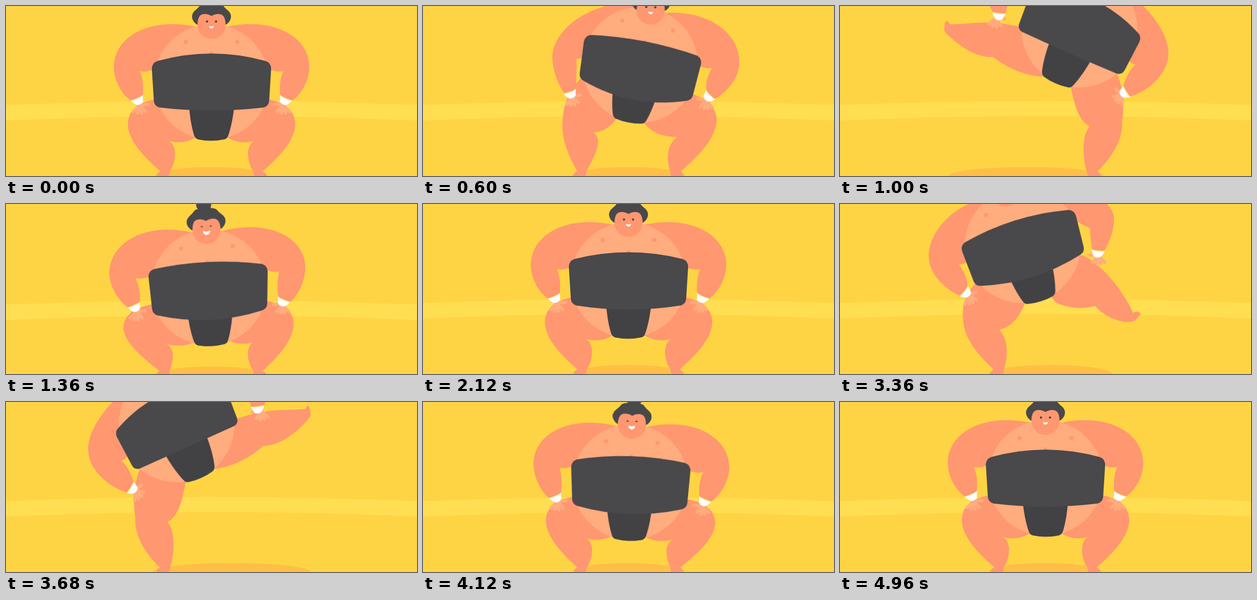
Animation, 820 px wide and 340 px high, one loop 5000 ms. Source, as an HTML page without scripts:

```html
<!DOCTYPE html>
<html lang="en">
<head>
<meta charset="utf-8">
<title>Sumo stomp</title>
<style>
html, body { margin: 0; width: 100%; height: 100%; overflow: hidden; background: #ffd444; }
svg { display: block; width: 100vw; height: 100vh; }
.skin { fill: #ff9770; }
.pale { fill: #ffac7e; }
.dark { fill: #49484b; }
.fingers { fill: none; stroke: #ffac7e; stroke-width: 6.5; stroke-linecap: round; }

/* Each stomp takes 2.4s and plays twice per loop, the first time mirrored. */
.move { animation: 5s ease-in-out infinite; }
.flip { animation-name: flip; animation-timing-function: step-end; transform-origin: 410px 0; }
.world { animation-name: shake; }
.shadow { animation-name: shadow; }
.leg-l { animation-name: leg-l; }
.leg-r { animation-name: leg-r; }
.arm-l { animation-name: arm-l; }
.arm-r { animation-name: arm-r; }
.band-l { animation-name: band-l; transform-origin: 261px 184px; }
.band-r { animation-name: band-r; transform-origin: 559px 184px; }
.hand-l { animation-name: hand-l; transform-origin: 268px 203px; }
.hand-r { animation-name: hand-r; transform-origin: 552px 203px; }
.torso { animation-name: torso; transform-origin: 410px 152px; }
.navel { animation-name: navel; }
.belt { animation-name: belt; }
.head { animation-name: head; transform-origin: 410px 38px; }
.eyes { animation-name: squint; transform-origin: 410px 31px; }
.mouth { animation-name: grin; transform-origin: 410px 40px; }

@keyframes flip {
  0% { transform: scaleX(-1); }
  51%, 100% { transform: none; }
}
@keyframes shake {
  0%, 24.6%, 31.2%, 52%, 76.6%, 83.2%, 100% { transform: none; }
  25.6%, 77.6% { transform: translateY(5px); }
  27.2%, 79.2% { transform: translateY(3px); }
}
@keyframes shadow {
  0%, 12%, 26%, 52%, 64%, 78%, 100% { cx: 410px; rx: 113px; }
  21.6%, 73.6% { cx: 450px; rx: 158px; }
}
@keyframes torso {
  0%, 42.4%, 52%, 94.4%, 100% { transform: none; }
  4%, 56% { transform: translate(8px, 4px) rotate(3.3deg); animation-timing-function: ease-in; }
  8.8%, 60.8% { transform: translate(-6px, -8px) rotate(-3.3deg); animation-timing-function: linear; }
  12%, 64% { transform: translate(-23px, -34px) rotate(-11deg); animation-timing-function: cubic-bezier(.3,.4,.6,1); }
  21.6%, 73.6% { transform: translate(-69.5px, -107px) rotate(-24.3deg); }
  26%, 27.2%, 78%, 79.2% { transform: translate(5.5px, 12px) rotate(2.8deg); animation-timing-function: ease-out; }
}
@keyframes head {
  0%, 42.4%, 52%, 94.4%, 100% { transform: none; }
  4%, 56% { transform: translate(14px, 5px) rotate(1deg); animation-timing-function: ease-in; }
  8.8%, 60.8% { transform: translate(-11.5px, -4px) rotate(2deg); animation-timing-function: linear; }
  12%, 64% { transform: translate(-44px, -28.5px) rotate(-2deg); animation-timing-function: cubic-bezier(.3,.4,.6,1); }
  21.6%, 73.6% { transform: translate(-118px, -96px) rotate(-12deg); }
  26%, 27.2%, 78%, 79.2% { transform: translate(10px, 11px) rotate(3deg); animation-timing-function: ease-out; }
}
@keyframes squint {
  0%, 21.6%, 48%, 52%, 73.6%, 100% { transform: none; }
  26%, 27.2%, 78%, 79.2% { transform: scaleY(.5); animation-timing-function: ease-out; }
}
@keyframes grin {
  0%, 21.6%, 48%, 52%, 73.6%, 100% { transform: none; }
  26%, 27.2%, 78%, 79.2% { transform: scale(1.55); animation-timing-function: ease-out; }
}
@keyframes navel {
  0%, 21.6%, 48%, 52%, 73.6%, 100% { transform: none; }
  8.8%, 60.8% { transform: translateY(5px); animation-timing-function: linear; }
  12%, 64% { transform: translateY(10px); }
  26%, 27.2%, 78%, 79.2% { transform: translateY(6px); animation-timing-function: linear; }
}
@keyframes belt {
  0%, 48%, 52%, 100% { d: path("M291 126Q291 114 302 110Q410 80 518 110Q529 114 529 126L525 190Q524 200 514 203Q410 215 306 203Q296 200 295 190Z"); }
  8.8%, 60.8% { d: path("M291 126Q291 114 302 110Q410 92 518 110Q529 114 529 126L525 190Q524 200 514 203Q410 227 306 203Q296 200 295 190Z"); animation-timing-function: linear; }
  12%, 64% { d: path("M291 128Q291 116 302 112Q410 96 518 112Q529 116 529 128L525 192Q524 202 514 205Q410 241 306 205Q296 202 295 192Z"); }
  21.6%, 73.6% { d: path("M291 126Q291 114 302 110Q410 61 518 110Q529 114 529 126L525 190Q524 200 514 202Q410 202 306 202Q296 200 295 190Z"); }
  26%, 27.2%, 78%, 79.2% { d: path("M291 126Q291 114 302 110Q410 92 518 110Q529 114 529 126L525 190Q524 200 514 203Q410 231 306 203Q296 200 295 190Z"); animation-timing-function: linear; }
}
@keyframes leg-l {
  0%, 4%, 42.4%, 52%, 56%, 94.4%, 100% { d: path("M330 180L295 187C258 195 243 212 243 238C245 275 285 310 308 331Q300 334 301 342L324 342Q326 336 327 330C336 318 345 284 326 270C345 276 366 272 382 260L400 220Z"); animation-timing-function: ease-in; }
  8.8%, 60.8% { d: path("M325 178L290 187C256 195 241 212 241 237C243 275 285 310 308 331Q300 334 301 342L324 342Q326 336 327 330C334 316 342 284 323 269C345 273 364 268 380 256L400 215Z"); animation-timing-function: linear; }
  12%, 64% { d: path("M330 160L280 177C245 190 234 208 234 231C238 271 280 308 306 331Q299 334 301 342L324 342Q326 336 327 330C333 312 337 280 313 262C340 262 363 255 380 233L395 190Z"); animation-timing-function: cubic-bezier(.3,.4,.6,1); }
  21.6%, 73.6% { d: path("M300 110L268 132C254 165 253 200 258 231C256 270 280 305 307 331Q299 334 301 342L324 342Q327 336 328 330C334 310 341 262 322 240C344 230 352 195 359 158L350 110Z"); }
  26%, 27.2%, 78%, 79.2% { d: path("M330 185L290 193C262 200 246 214 246 238C248 275 286 310 308 331Q300 334 301 342L324 342Q326 336 327 330C336 318 345 288 328 274C347 279 366 277 382 266L400 225Z"); animation-timing-function: ease-out; }
}
@keyframes leg-r {
  0%, 4%, 42.4%, 52%, 56%, 94.4%, 100% { d: path("M490 180L525 187C562 195 577 212 577 238C575 275 535 310 512 331Q520 334 519 342L496 342Q494 336 493 330C484 318 475 284 494 270C475 276 454 272 438 260L420 220Z"); animation-timing-function: ease-in; }
  8.8%, 60.8% { d: path("M490 178L518 186C550 194 564 214 564 240C562 275 533 312 512 331Q520 334 519 342L496 342Q494 336 493 330C484 316 473 284 492 268C475 270 456 264 440 254L420 215Z"); animation-timing-function: linear; }
  12%, 64% { d: path("M470 130L502 142C532 168 542 205 542 238C542 275 525 308 512 331Q520 334 519 342L496 342Q494 336 493 330C482 308 457 270 480 253C465 253 450 246 436 228L410 190Z"); animation-timing-function: linear; }
  16.8%, 68.8% { d: path("M440 90L478 84C505 95 530 108 555 124C580 140 605 152 620 162Q632 152 640 160L634 180Q622 188 606 190C575 196 550 192 524 180C490 190 460 190 428 182L395 140Z"); animation-timing-function: ease-out; }
  21.6%, 73.6% { d: path("M400 40L462 33C485 25 510 19 535 17C556 15 578 16 597 14Q602 2 606 12L608 27Q604 34 598 40C575 65 545 87 513 88C485 113 450 130 415 134L380 90Z"); }
  26%, 27.2%, 78%, 79.2% { d: path("M490 188L535 199C568 206 586 222 586 246C582 280 537 312 514 331Q520 334 519 342L496 342Q494 336 493 330C490 318 478 290 500 277C480 283 455 281 438 270L420 230Z"); animation-timing-function: ease-out; }
}
@keyframes arm-l {
  0%, 42.4%, 52%, 94.4%, 100% { d: path("M390 44C290 18 215 60 215 122C215 150 232 178 249 189L273 179C275 158 272 142 267 130Q280 134 300 124Z"); }
  4%, 56% { d: path("M400 48C304 20 224 62 224 122C224 150 236 178 251 189L275 179C277 160 275 144 271 131Q284 135 303 126Z"); animation-timing-function: ease-in; }
  8.8%, 60.8% { d: path("M378 40C282 16 207 58 207 120C207 150 229 178 246 188L269 178C271 158 267 142 260 130Q274 133 295 122Z"); animation-timing-function: linear; }
  12%, 64% { d: path("M338 14C250 8 189 55 189 112C189 145 214 172 238 186L254 170C258 152 250 135 243 124Q256 126 275 118Z"); animation-timing-function: cubic-bezier(.3,.4,.6,1); }
  21.6%, 73.6% { d: path("M270 -44C230 -25 164 40 164 95C164 135 205 170 241 181L255 160C250 145 243 128 230 117Q238 116 245 105Z"); }
  26%, 27.2%, 78%, 79.2% { d: path("M392 52C298 25 223 64 223 124C223 150 237 180 253 193L277 183C279 162 279 146 275 132Q285 135 303 128Z"); animation-timing-function: ease-out; }
}
@keyframes arm-r {
  0%, 42.4%, 52%, 94.4%, 100% { d: path("M430 44C530 18 605 60 605 122C605 150 588 178 571 189L547 179C545 158 548 142 553 130Q540 134 520 124Z"); }
  4%, 56% { d: path("M446 48C544 26 619 66 619 126C619 155 592 182 574 192L550 181C549 162 553 146 559 135Q546 139 526 130Z"); animation-timing-function: ease-in; }
  8.8%, 60.8% { d: path("M416 38C520 6 593 62 593 122C593 150 577 180 559 196L536 187C536 165 538 145 543 130Q532 132 515 124Z"); animation-timing-function: linear; }
  12%, 64% { d: path("M395 -5C490 -11 562 51 562 102C562 130 550 158 539 175L516 167C514 145 513 125 514 106Q508 107 495 100Z"); animation-timing-function: cubic-bezier(.3,.4,.6,1); }
  21.6%, 73.6% { d: path("M330 -65C430 -100 525 -85 530 -50C532 -30 522 -10 515 6L489 10C487 0 484 -5 482 -14Q465 -25 440 -40Z"); }
  26%, 27.2%, 78%, 79.2% { d: path("M448 54C544 32 614 76 614 135C614 160 597 190 577 204L553 193C552 172 555 158 562 145Q548 149 530 140Z"); animation-timing-function: ease-out; }
}
@keyframes band-l {
  0%, 42.4%, 52%, 94.4%, 100% { transform: none; }
  4%, 56% { transform: translate(2px, 0); animation-timing-function: ease-in; }
  8.8%, 60.8% { transform: translate(-3.5px, -1px); animation-timing-function: linear; }
  12%, 64% { transform: translate(-15px, -6px) rotate(-20deg); animation-timing-function: cubic-bezier(.3,.4,.6,1); }
  21.6%, 73.6% { transform: translate(-13px, -13px) rotate(-34deg); }
  26%, 27.2%, 78%, 79.2% { transform: translate(4px, 4px); animation-timing-function: ease-out; }
}
@keyframes band-r {
  0%, 42.4%, 52%, 94.4%, 100% { transform: none; }
  4%, 56% { transform: translate(3px, 2.5px); animation-timing-function: ease-in; }
  8.8%, 60.8% { transform: translate(-11.5px, 7.5px); animation-timing-function: linear; }
  12%, 64% { transform: translate(-31.5px, -12.5px) rotate(-3deg); animation-timing-function: cubic-bezier(.3,.4,.6,1); }
  21.6%, 73.6% { transform: translate(-57px, -175.5px) rotate(-32deg); }
  26%, 27.2%, 78%, 79.2% { transform: translate(6px, 15px); animation-timing-function: ease-out; }
}
@keyframes hand-l {
  0%, 42.4%, 52%, 94.4%, 100% { transform: none; }
  4%, 56% { transform: translate(2px, 0); animation-timing-function: ease-in; }
  8.8%, 60.8% { transform: translate(-3px, -1px); animation-timing-function: linear; }
  12%, 64% { transform: translate(-12px, -9px) rotate(-5deg); animation-timing-function: cubic-bezier(.3,.4,.6,1); }
  21.6%, 73.6% { transform: translate(-6px, -22px) rotate(-42deg); }
  26%, 27.2%, 78%, 79.2% { transform: translate(2px, 1px); animation-timing-function: ease-out; }
}
@keyframes hand-r {
  0%, 42.4%, 52%, 94.4%, 100% { transform: none; }
  4%, 56% { transform: translate(3px, 2px); animation-timing-function: ease-in; }
  8.8%, 60.8% { transform: translate(-12px, 5px); animation-timing-function: linear; }
  12%, 64% { transform: translate(-31px, -16px) rotate(10deg); animation-timing-function: cubic-bezier(.3,.4,.6,1); }
  21.6%, 73.6% { transform: translate(-44px, -179px) rotate(-8deg); }
  26%, 27.2%, 78%, 79.2% { transform: translate(6.5px, 14px); animation-timing-function: ease-out; }
}
</style>
</head>
<body>
<svg viewBox="0 0 820 340">
  <defs>
    <path id="hand" class="fingers" d="M266 199L254 211M266 199L262 214M267 199L270 214.5M268 199L278 211M265 197L284 197"/>
    <path id="band" fill="#fff" d="M249 189Q263 187 273 178L273.5 191Q270 198 262 198Q256 197 249 189Z"/>
  </defs>
  <g class="move flip">
    <g class="move world">
      <path fill="#ffde52" d="M0 198Q410 182 820 198V229Q410 211 0 229Z"/>
      <ellipse class="move shadow" cx="410" cy="340" rx="113" ry="18" fill="#ffbf47"/>
      <g class="skin">
        <path class="move leg-l"/>
        <path class="move leg-r"/>
        <path class="move arm-l"/>
        <path class="move arm-r"/>
      </g>
      <g class="move hand-l"><use href="#hand"/></g>
      <g class="move hand-r"><use href="#hand" transform="matrix(-1 0 0 1 820 0)"/></g>
      <g class="move band-l"><use href="#band"/></g>
      <g class="move band-r"><use href="#band" transform="matrix(-1 0 0 1 820 0)"/></g>

      <g class="move torso">
        <circle class="pale" cx="410" cy="152" r="115.5"/>
        <g class="skin">
          <circle cx="358.5" cy="72" r="4"/>
          <circle cx="461.5" cy="72" r="4"/>
          <circle class="move navel" cx="410" cy="95" r="4"/>
        </g>
        <path fill="#424144" d="M364 195L455 195Q453 232 445 258Q442 266 436 267Q411 272 386 267Q379 266 377 260Q368 235 364 195Z"/>
        <path class="move belt dark"/>
      </g>

      <g class="move head">
        <g class="dark">
          <ellipse cx="413" cy="-12" rx="15" ry="12"/>
          <path d="M383 38C373 34 366 20 376 10C383 4 384 3 387 -1C392 -8 428 -8 433 -1C436 3 437 4 444 10C454 20 447 34 437 38Z"/>
        </g>
        <path class="skin" d="M382 38C382 28 384 16 396 16Q404 16 410 20Q416 16 424 16C436 16 438 28 438 38A28 28 0 0 1 382 38Z"/>
        <g class="move eyes dark">
          <circle cx="401" cy="31" r="2.3"/>
          <circle cx="419" cy="31" r="2.3"/>
        </g>
        <path class="move mouth" fill="#fff" d="M405 40Q410 41.5 415 40Q414 45 410 45Q406 45 405 40Z"/>
      </g>
    </g>
  </g>
</svg>
</body>
</html>
```
